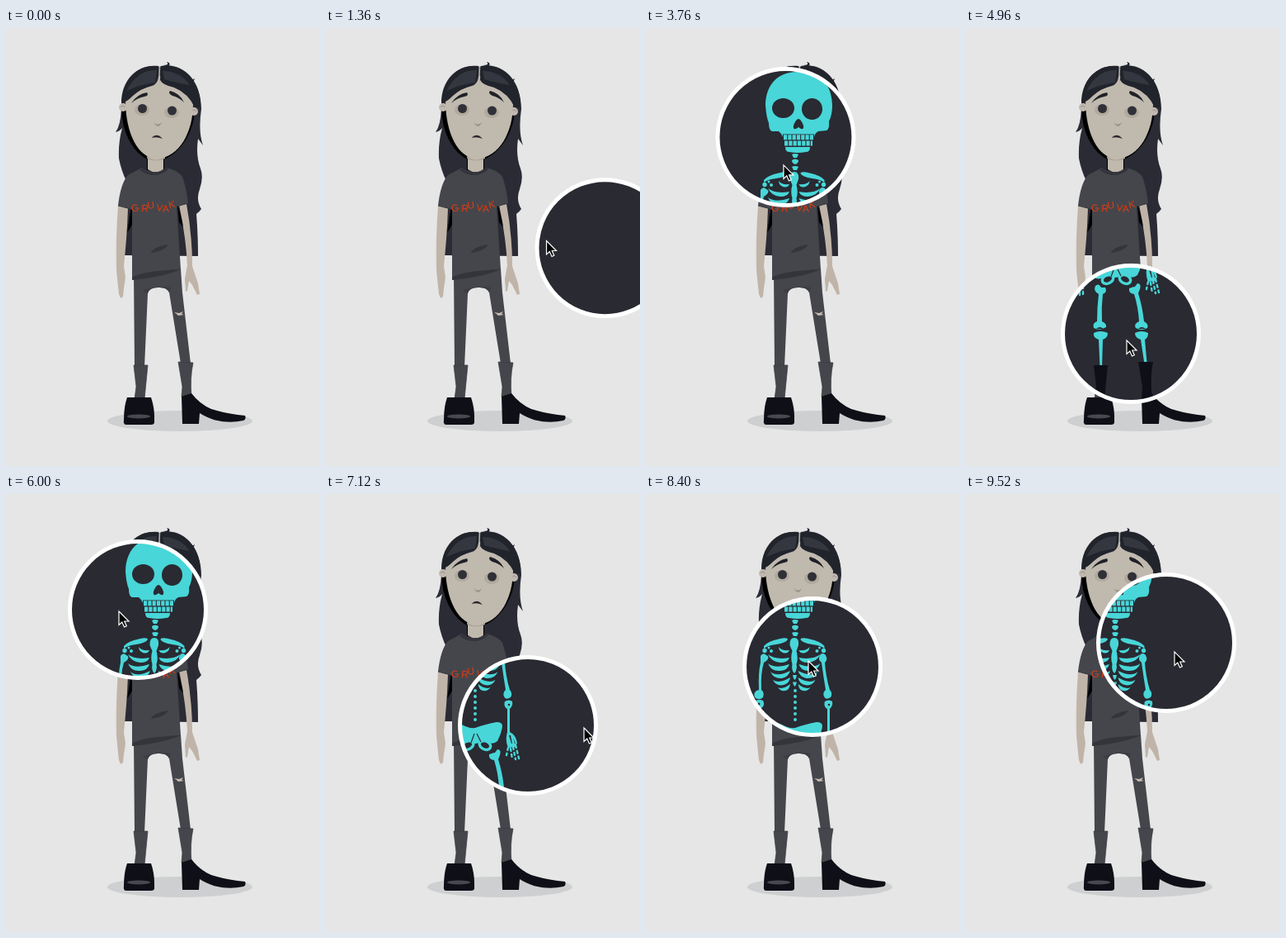
An HTML page that plays this animation: 381x530 px, repeating every 9600 ms.

```html
<!DOCTYPE html>
<html lang="en">
<head>
<meta charset="utf-8">
<title>X-ray lens</title>
<style>
  html, body { margin: 0; width: 100%; height: 100%; overflow: hidden; background: #e6e6e6; }
  svg { display: block; width: 100vw; height: 100vh; }
  .hair { fill: #2a2b34; }
  .front { fill: #22242c; }
  .skin { fill: #c0b9ae; }
  .arm { fill: #c0b4a9; }
  .cloth { fill: #45464c; }
  .fold { fill: #34353b; }
  .shoe { fill: #0e0f17; }
  .bone { fill: #48d6d8; }
  .line { fill: none; stroke: #48d6d8; stroke-linecap: round; }
  .void { fill: #292a32; }
  .word { font: 15px "Liberation Sans", Arial, sans-serif; fill: #e03c10; }
</style>
</head>
<body>
<svg viewBox="0 0 381 530" preserveAspectRatio="none">
  <defs>
    <clipPath id="hole"><circle id="cut" r="81"/></clipPath>
    <g id="shoes" class="shoe">
      <path d="M147 447H176Q180 459 180 470V477Q180 480 176 480H146Q142 480 143 474Q143 458 147 447Z"/>
      <path d="M213 446L225 442Q235 455 249 461Q268 467 290 469Q292 473 288 475Q270 479 252 474Q241 470 235 466L234 479H214Z"/>
      <ellipse cx="161" cy="470" rx="14" ry="2.4" fill="#484950"/>
    </g>
    <g id="side">
      <path d="M143 184Q148 178 161 175.500Q172 173 172 176Q170 180 158 182Q148 183 143 187Z"/>
      <path d="M161 185Q164 190 174 189Q172 194 166 192Q161 190 161 185Z"/>
      <path d="M148 194Q157 201 174 198Q172 204 163 204Q152 203 148 194Z"/>
      <path d="M148 205Q157 212 174 206Q172 213 163 214Q152 215 148 205Z"/>
      <path d="M151 215Q159 222 175 214Q173 221 165 223Q155 224 151 215Z"/>
      <path d="M154 225Q162 230 175 222Q174 229 167 231Q158 233 154 225Z"/>
      <path d="M160 234Q166 237 175 230Q174 237 169 238Q163 239 160 234Z"/>
      <circle cx="144" cy="189.500" r="2.700"/><circle cx="152" cy="190" r="2"/><circle cx="149" cy="186" r="1.500"/>
    </g>
  </defs>

  <rect width="381" height="530" fill="#e6e6e6"/>
  <ellipse cx="211" cy="475.500" rx="88" ry="12.500" fill="#cecfd1"/>

  <!-- back hair -->
  <path class="hair" d="M185 47C160 42 140 63 140 98Q139 118 133 126Q138 125 141 121Q136 139 137 158Q140 173 146 185V230L142 275L233 276Q233 250 231 225Q235 222 237 219Q230 208 235 195Q240 181 236 170Q230 155 233 134L239 142Q233 125 237 98C237 62 212 41 185 47Z"/>

  <!-- neck and jaw -->
  <path d="M140 100C142 132 157 151 171 159V172H192V159C211 151 227 128 229 102Z"/>
  <path class="skin" d="M172 150H191V171Q182 178 172 171Z"/>
  <path d="M171 155Q182 164 193 155V158Q182 163 171 158Z" fill="#aaa397"/>
  <path d="M153 210L147 248L153 238ZM208 212L216 242L210 235Z"/>

  <!-- arms -->
  <path class="arm" d="M136 215L148 218Q147 250 143 288L145 302L143 315L142 325L139 327L137 322L136 313L134 293Q133 252 136 215Z"/>
  <path class="arm" d="M210 214L219 213Q226 250 226 288L233 309L235 322L232 323L226 311L222 306L220 318L218 319L217 303L220 287Q218 250 210 214Z"/>

  <!-- trousers -->
  <path class="cloth" d="M155 297L212 291L214 320L224 406H212L198 320Q195 313 184 314Q174 314 172 321L168 410H156Z"/>
  <path d="M172 321Q174 314 184 314Q195 313 198 320L200 314Q183 311 165 318Z" fill="#3c3d43"/>
  <path class="cloth" d="M155 408L172 408L168 449H156L158 434ZM209 404L227 405Q223 424 225 446H213L214 434Z" stroke="#3b3c42" stroke-width=".7"/>
  <path d="M204 344L210 345L215 343L213 346L216 347L209 348L207 346Z" fill="#c5bdb1"/>
  <use href="#shoes"/>

  <!-- shirt -->
  <path class="cloth" d="M165 169Q180 180 195 169Q211 174 214 180Q219 194 221 212L207 216L212 292Q184 297 153 303L153 220L136 215Q139 188 148 178Z"/>
  <path class="fold" d="M165 169Q180 180 195 169L197 171Q181 185 162 172Z"/>
  <path class="fold" d="M153 302Q164 294 212 292Q193 301 153 305Z"/>
  <path class="fold" d="M176 272Q178 265 197 262Q192 270 176 272Z"/>
  <path d="M136 215L152 219M207 216L221 212" stroke="#393a40" fill="none"/>
  <text class="word" x="153 164 172 182 190 198" y="223 222 219 221 223 218" rotate="-14 4 -8 7 -4 -10" font-size="13" style="font-size:12px">GRUVAK</text>

  <!-- face -->
  <circle class="skin" cx="142" cy="96" r="5"/>
  <circle class="skin" cx="228" cy="101" r="5"/>
  <path d="M139 96Q142 92 144 96M231 101Q228 97 226 101" fill="none" stroke="#938c82"/>
  <path class="skin" d="M145 88Q150 62 186 58Q222 60 227 92C227 125 211 156 184 158C161 159 145 128 145 88Z"/>
  <ellipse cx="165" cy="99" rx="9" ry="7" fill="#b1a99e"/>
  <ellipse cx="201" cy="102" rx="9" ry="7" fill="#b1a99e"/>
  <circle cx="165.500" cy="97.500" r="5.500" fill="#303137"/>
  <circle cx="201.500" cy="100" r="5.500" fill="#303137"/>
  <path d="M152 91Q159 80 171 78Q174 82 168 83Q160 84 152 91ZM216 90Q211 79 199 76Q196 79 202 82Q210 84 216 90Z" fill="#202128"/>
  <path d="M179 114Q184 119 189 114Q187 119 184 119Q181 118 179 114Z" fill="#9d9286"/>
  <path d="M176.500 133Q183 126 190 134Q183 131 176.500 133Z" fill="#25252b"/>

  <!-- front hair -->
  <path class="front" d="M185 46C162 43 140 60 140 91Q146 90 154 82Q164 73 177 70Q184 68 185 59Z"/>
  <path class="front" d="M188 46C212 41 237 61 236 96L229 96Q221 79 204 72Q190 69 187 63Z"/>
  <path d="M183 51Q160 50 146 76Q164 68 181 66ZM190 52Q211 52 223 69Q205 66 192 62Z" fill="#343740"/>
  <path d="M186.500 46L185.500 67" stroke="#bdb6ab" stroke-width="1.500"/>
  <path d="M191 45Q199 45 195 41Q201 42 197 47ZM222 65Q226 63 229 61Q228 65 225 69Z" class="front"/>

  <!-- x-ray layer -->
  <g clip-path="url(#hole)">
    <rect class="void" width="381" height="530"/>
    <g class="bone">
      <path d="M186 53C157 52 145 72 145 94Q146 108 149 115Q149 124 153 125L161 125Q165 128 166 132H204Q205 127 209 125L219 124Q223 122 222 113Q226 105 226 94C226 70 213 54 186 53Z"/>
      <g class="void">
        <ellipse cx="166.500" cy="97" rx="13.500" ry="12"/>
        <ellipse cx="201.500" cy="98" rx="12.500" ry="13"/>
        <path d="M185 110Q188 110 191 118Q192 123 188 122L185 120L182 122Q178 123 179 118Q182 110 185 110Z"/>
        <rect x="166" y="128.500" width="38" height="16"/>
      </g>
      <path d="M169 144H199Q199 150 194 150Q184 152 174 150Q169 150 169 144Z"/>
      <path class="line" style="stroke-linecap:butt" d="M167 132.300H203M168 139.500H202" stroke-width="6" stroke-dasharray="4.200 1.100"/>
      <path d="M177 153Q181 151 185 153L183 157H179ZM177 160Q181 157 185 160Q185 164 181 165Q177 164 177 160ZM177 168Q181 166 185 168L183 172H179Z"/>
      <path d="M180 174Q186 174 185 183L182.500 190Q185 199 182.500 206Q184 213 180 217Q176 213 177.500 206Q175 198 177.500 190L174.500 183Q174 174 180 174Z"/>
      <use href="#side"/>
      <use href="#side" transform="matrix(-1 0 0 1 359.500 0)"/>
      <path d="M178 219H183L182 223L180.500 225L179 223ZM178 227.500H183L182 231L180.500 233L179 231Z"/>
      <path class="line" d="M181 238V277" stroke-width="4" stroke-dasharray="0 7"/>

      <!-- arms -->
      <path id="humerus" d="M139 196Q142 191 146 195Q151 197 146 202L143 204Q139 217 140 237Q144 240 142 246Q138 250 133 247Q129 242 134 238L137 237Q136 216 139 204Z"/>
      <path d="M211 195Q214 191 218 195Q221 201 217 204Q218 220 223 237Q227 241 224 246Q218 250 216 245Q214 240 218 237Q215 219 213 204Q208 200 211 195Z"/>
      <path d="M133 250Q138 248 142 250Q145 256 140 259L139 263Q138 276 141 289Q147 296 145 304L141 311L134 310Q133 301 137 289Q135 275 135 259Q130 256 133 250Z"/>
      <path d="M217 251Q222 248 226 251Q227 257 223 260V288Q230 291 232 301L230 306L221 307Q217 298 220 288V260Q215 257 217 251Z"/>
      <g class="void"><circle cx="137" cy="254" r="1.500"/><circle cx="222" cy="255" r="1.300"/><path d="M222 292L225 302L226 302L224 292ZM227 295L229 302H230Z"/></g>
      <path class="line" d="M135 312L134 325M138 313L138 326M142 312L142 325M221 307L219 316M224 308L226 321M227 306L230 321M230 304L234 320" stroke-width="2.400" stroke-dasharray="3 4"/>

      <!-- pelvis -->
      <path d="M153 280Q158 276 165 279Q173 284 181 283Q192 279 207 276Q214 276 214 281Q213 289 208 299Q202 304 196 300L181 302L168 301Q160 306 155 301Q154 297 158 295Q152 289 153 280Z"/>
      <ellipse class="line" cx="172" cy="304" rx="7" ry="5" stroke-width="3.500" transform="rotate(-25 172 304)"/>
      <ellipse class="line" cx="193" cy="304" rx="7" ry="5" stroke-width="3.500" transform="rotate(25 193 304)"/>
      <ellipse class="void" cx="172" cy="304" rx="5" ry="3" transform="rotate(-25 172 304)"/>
      <ellipse class="void" cx="193" cy="304" rx="5" ry="3" transform="rotate(25 193 304)"/>
      <path d="M180 290L176 301M183 290L188 300" stroke="#292a32" stroke-width="1.200"/>

      <!-- legs -->
      <path d="M157 312Q161 308 164 314L169 314Q172 319 166 322Q164 338 165 355Q171 358 170 362Q162 367 155 363Q153 357 159 355Q159 338 161 322Q154 318 157 312Z"/>
      <path d="M208 309Q213 309 211 316L209 321Q214 337 216 355Q222 358 220 363Q213 367 206 363Q203 358 210 355Q209 338 204 322Q197 321 198 315Q203 313 205 313Z"/>
      <path d="M155 369Q163 365 172 369Q172 375 166 377L165 410H162.500L161 377Q154 375 155 369ZM205 369Q213 365 221 369Q221 375 217 377L220 410H217L212 377Q205 375 205 369Z"/>
      <path class="void" d="M158 364Q162 360 167 364ZM209 364Q213 360 218 364Z"/>
    </g>
    <path class="shoe" d="M155 408H172L168 450H153L158 434ZM209 404H227Q223 424 226 447H213L214 434Z"/>
    <use href="#shoes"/>
  </g>
  <circle id="ring" r="82.500" fill="none" stroke="#fff" stroke-width="5"/>
  <path id="arrow" d="M0 0V16.500L3.800 13L6.500 19L9.300 17.800L6.700 12H12Z" fill="#000" stroke="#fff" stroke-width="1.200"/>
</svg>
<script>
  const LOOP = 9600, STEP = 80, LEAD = 100;

  // time, x, y of the lens centre
  const path = [
    [1180, 500, 268], [1300, 385, 270], [1440, 285, 258], [1600, 200, 237], [1840, 173, 243], [2740, 173, 243],
    [3040, 173, 165], [3360, 167, 97], [3560, 167, 97],
    [4000, 176, 205], [4480, 194, 313], [4780, 194, 313],
    [4960, 200, 370], [5060, 200, 376], [5300, 205, 300], [5600, 195, 219], [5740, 195, 219],
    [6000, 160, 140], [6100, 142, 140], [6240, 110, 115], [6400, 165, 85], [6560, 245, 110],
    [6720, 150, 170], [6860, 85, 235], [7000, 145, 272], [7120, 245, 280], [7220, 318, 281],
    [7320, 310, 330], [7480, 215, 395], [7640, 135, 360], [7760, 117, 308],
    [8000, 140, 230], [8240, 190, 215], [8400, 202, 209], [8500, 202, 200], [8800, 165, 106],
    [8960, 161, 90], [9240, 195, 125], [9520, 243, 180], [9620, 258, 189]
  ];

  const same = (a, b) => a[1] === b[1] && a[2] === b[2];

  function slope(i, k) {
    const a = path[i - 1], p = path[i], b = path[i + 1];
    if (!a || !b || same(a, p) || same(p, b)) return 0;
    return (b[k] - a[k]) / (b[0] - a[0]);
  }

  function place(t) {
    const last = path.length - 1;
    if (t <= path[0][0]) return path[0].slice(1);
    if (t >= path[last][0]) return path[last].slice(1);
    const i = path.findIndex(p => p[0] > t) - 1;
    const a = path[i], b = path[i + 1], d = b[0] - a[0], u = (t - a[0]) / d;
    const ease = u * u * (3 - 2 * u);
    return [1, 2].map(k => a[k] + (b[k] - a[k]) * ease
      + d * u * (1 - u) * (slope(i, k) * (1 - u) - slope(i + 1, k) * u));
  }

  const byId = id => document.getElementById(id);
  const cut = byId("cut"), ring = byId("ring"), arrow = byId("arrow");
  const start = performance.now();

  function draw() {
    const now = Math.max(0, performance.now() - start) % LOOP;
    const t = Math.floor(now / STEP) * STEP;
    const [x, y] = place(t), [cx, cy] = place(t + LEAD);
    for (const c of [cut, ring]) {
      c.setAttribute("cx", x);
      c.setAttribute("cy", y);
    }
    arrow.setAttribute("transform", `translate(${cx - 5} ${cy + 2})`);
    requestAnimationFrame(draw);
  }
  draw();
</script>
</body>
</html>
```
